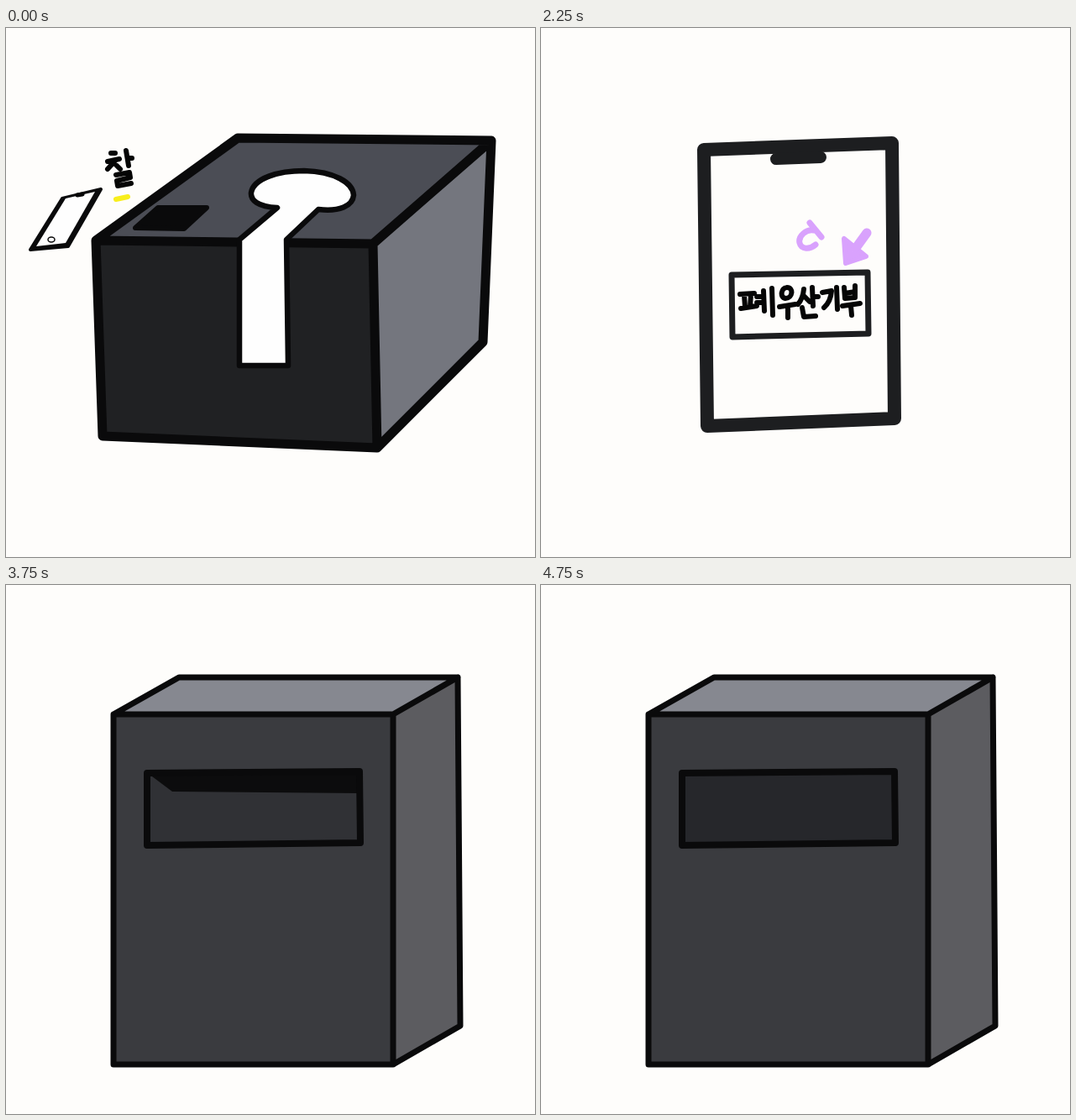
An HTML page for the animation above (5000 ms loop, 630 by 630 pixels).

```html
<!DOCTYPE html>
<html lang="ko">
<head>
<meta charset="utf-8">
<title>폐우산기부</title>
<style>
  html, body { margin: 0; width: 100%; height: 100%; overflow: hidden; background: #fefdfb; }
  svg { display: block; width: 100vw; height: 100vh; }
  path, g { stroke-linecap: round; stroke-linejoin: round; }
  [data-show] { visibility: hidden; }
  .pen { fill: none; stroke: #050505; stroke-width: 6; }
  .flash { fill: none; stroke: #f8ee1c; stroke-width: 6; }
  .click { fill: none; stroke: #d9a2fd; stroke-width: 7; }
  .edge { fill: none; stroke: #0a0a0b; }
</style>
</head>
<body>
<svg viewBox="0 0 630 630" role="img" aria-label="찰칵! 폐우산기부 Click!">
  <defs>
    <g id="umbrella" fill="none" stroke="#392e08" stroke-width="6">
      <path d="M42 411C40 396 46 389 55 389C65 389 67 399 67 409L66 428" stroke-width="12"/>
      <path d="M32 448L77 601L103 443Z" fill="#fdf0b4"/>
      <path d="M32 447Q46 456 56 443Q61 451 67 451Q74 450 79 442Q89 454 103 442L99 457Q87 469 77 457Q73 466 67 466Q60 465 56 456Q48 468 36 461Z" fill="#fcd65c" stroke-width="5.5"/>
      <path d="M66 428L67 465"/>
      <path d="M46 475L60 473M46 486L57 480M53 467L55 484M95 485L82 491M76 496L82 493L75 507L92 506M84 483L89 496M60 530L72 527M64 523L67 533L71 531L70 540L76 543L64 549" stroke-width="4.5"/>
    </g>
  </defs>

  <g data-show="0 1500">
    <path d="M276 131L578 134L437 257L107 253Z" fill="#4b4d55"/>
    <path d="M107 253L437 257L442 500L115 486Z" fill="#202123"/>
    <path d="M578 134L568 374L442 500L437 257Z" fill="#74767e"/>
    <path class="edge" stroke-width="11" d="M107 253L276 131L578 134L568 374L442 500L115 486ZL437 257L578 134M437 257L442 500"/>
    <path d="M323 214C300 213 291 205 292 196C295 179 324 170 355 170C391 171 413 184 414 199C413 212 397 219 372 216L334 252L336 402L278 402L278 252Z" fill="#fefefe" stroke="#0a0a0b" stroke-width="6.5"/>
    <path d="M154 238L181 214L239 214L212 239Z" fill="#0a0a0b" stroke="#0a0a0b" stroke-width="6"/>
    <path d="M29 264L67 203L113 192L74 260Z" fill="#0a0a0b" stroke="#0a0a0b" stroke-width="4"/>
    <path d="M36 260L71 203L106 195L71 256Z" fill="#fefefe"/>
    <path class="pen" stroke-width="5" d="M85 199L91 198" style="stroke-width:5"/>
    <ellipse cx="54" cy="252" rx="4" ry="3" fill="none" stroke="#0a0a0b" stroke-width="1.5"/>
    <path class="pen" d="M125 149L130 149M121 159L135 156M131 157L121 168M129 161L136 168M143 146L146 164M146 155L150 155M131 175L147 172L148 178L132 182L133 188L149 185"/>
    <path class="flash" d="M131 204L145 201"/>
  </g>
  <g data-show="500 1500">
    <path class="pen" d="M156 149L167 146Q166 156 157 163M156 156L164 154M173 138L175 158M175 148L182 148M162 168L177 166L178 177"/>
    <path class="flash" d="M126 220L141 225"/>
  </g>
  <g data-show="1000 1500">
    <path class="pen" d="M198 135L199 155M201 166L201 167" style="stroke-width:8"/>
    <path class="flash" d="M114 234L121 247"/>
  </g>

  <g data-show="1500 3500">
    <path d="M194 145L418 137L421 465L198 474Z" fill="#fefdfb" stroke="#1d1e20" stroke-width="16"/>
    <path d="M280 156L333 154" stroke="#1d1e20" stroke-width="14"/>
    <path d="M227 294L389 291L390 364L228 368Z" fill="none" stroke="#1d1e20" stroke-width="7"/>
    <path class="pen" d="M237 317L254 316M242 318L243 332M250 317L249 332M238 334L257 331M257 320L264 320M257 327L264 327M265 313L266 337M275 310L276 342M293 309C286 309 284 321 291 322C300 322 301 309 293 309M284 332L303 329M294 331L294 345M313 311Q312 322 306 329M313 319L320 326M323 309L324 331M325 320L330 320M311 333L313 344L327 343M335 315L346 313Q345 326 337 333M352 309L353 335M361 309L362 322L374 321L374 307M362 316L374 314M359 331L380 328M369 331L370 342"/>
  </g>
  <g data-show="1750 3500">
    <path d="M361 251L363 280L387 272Z" fill="#d9a2fd" stroke="#d9a2fd" stroke-width="6"/>
    <path class="click" d="M375 262L388 244" style="stroke-width:11"/>
  </g>
  <path class="click" data-show="2000 3500" d="M325 241C316 239 306 248 308 256C310 264 320 264 327 258"/>
  <path class="click" data-show="2250 3500" d="M320 232L334 249"/>
  <path class="click" data-show="2500 3500" d="M327 223L327 223.1M333 231L342 242"/>
  <path class="click" data-show="2750 3500" d="M355 217C347 217 343 224 346 230C349 235 357 233 361 228"/>
  <path class="click" data-show="3000 3500" d="M353 200L366 221M367 204L362 213L379 214"/>
  <g data-show="3250 3500">
    <path d="M376 184L387 203L381 184Z" fill="#d9a2fd" stroke="#d9a2fd" stroke-width="7"/>
    <path class="click" d="M393 210L393 210.1"/>
  </g>

  <g data-show="3500 5000">
    <path d="M128 154L206 110L538 110L461 154Z" fill="#868890"/>
    <path d="M128 154L461 154L461 571L128 571Z" fill="#3a3b3f"/>
    <path d="M461 154L538 110L541 525L461 571Z" fill="#5c5c60"/>
    <path class="edge" stroke-width="7" d="M128 154L206 110L538 110L541 525L461 571L128 571ZL461 154L538 110M461 154L461 571"/>
    <path d="M168 224L421 222L422 307L168 310Z" fill="#26272b"/>
  </g>
  <path data-show="3750 4750" d="M168 224L421 222L422 307L168 310Z" fill="#0c0c0d"/>
  <path data-show="3750 4000, 4500 4750" d="M170 225L198 246L420 248L420 307L170 308Z" fill="#303135"/>
  <path data-show="4000 4500" d="M170 224L223 268L420 272L420 307L170 308Z" fill="#36373b"/>
  <path class="edge" data-show="3500 5000" stroke-width="8" d="M168 224L421 222L422 307L168 310Z"/>
  <use href="#umbrella" data-show="3500 3750"/>
  <use href="#umbrella" data-show="4000 4250" transform="translate(190 273) rotate(98.7) translate(-77 -601)"/>
</svg>
<script>
  const LOOP = 5000;
  const parts = [...document.querySelectorAll('[data-show]')].map(el => ({
    el,
    spans: el.dataset.show.split(',').map(s => s.trim().split(' ').map(Number))
  }));

  function draw() {
    const t = performance.now() % LOOP;
    for (const { el, spans } of parts) {
      const on = spans.some(([from, to]) => t >= from && t < to);
      el.style.visibility = on ? 'visible' : 'hidden';
    }
    requestAnimationFrame(draw);
  }
  draw();
</script>
</body>
</html>
```
